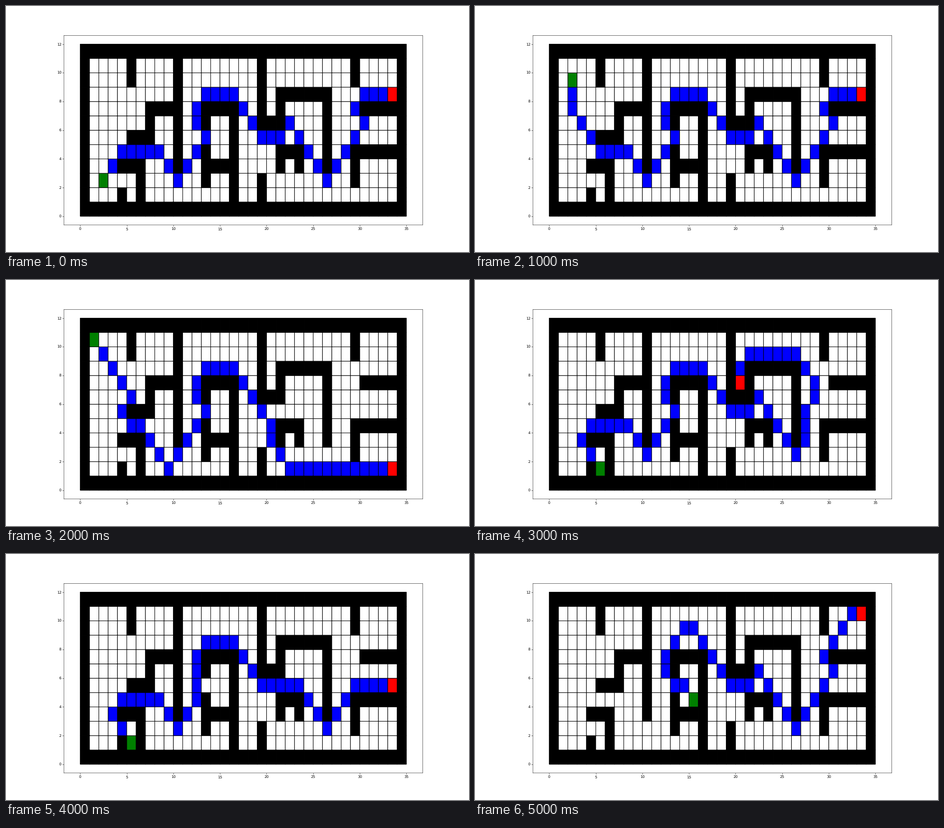
Write a matplotlib script that moves like this. It is 1026 px wide and 546 px high and loops after 6 s.

```python
import numpy as np
import matplotlib.pyplot as plt
from matplotlib.animation import FuncAnimation
from matplotlib.colors import ListedColormap

DPI = 57
W, H = 1026, 546
FREE, WALL, PATH, START, GOAL = range(5)
COLORS = ListedColormap(["white", "black", "blue", "green", "red"])

# Rooms inside the border, top row first; '#' is a wall.
ROOMS = """
....#....#........#.........#....
....#....#........#.........#....
.........#........#.######.......
......####..####..#.#....#...####
......#..#..#..#..###....#.......
....###..#.....#.........#.......
.........#..#..#....###..#..#####
...###...#..####....#.#..#..#....
.....#......#..#..#.........#....
...#.#.........#..#..............
""".split()

# Start, optional stops, goal; the walker finds the cells between.
TRIPS = [
    [(2, 2), (33, 8)],
    [(2, 9), (2, 8), (2, 7), (33, 8)],
    [(1, 10), (20, 3), (33, 1)],
    [(5, 1), (28, 6), (28, 7), (20, 7)],
    [(5, 1), (12, 5), (33, 5)],
    [(15, 4), (33, 10)],
]

inner = np.array([[WALL if c == "#" else FREE for c in row]
                  for row in reversed(ROOMS)])
maze = np.pad(inner, 1, constant_values=WALL)


def neighbours(cell):
    x, y = cell
    return [(i, j) for i in (x - 1, x, x + 1) for j in (y - 1, y, y + 1)
            if (i, j) != cell and maze[j, i] == FREE]


def distances(target):
    """Count the steps from every free cell to the target."""
    steps = {target: 0}
    queue = [target]
    for cell in queue:
        for near in neighbours(cell):
            if near not in steps:
                steps[near] = steps[cell] + 1
                queue.append(near)
    return steps


def walk(trip):
    """Take shortest legs, preferring cells nearer to the goal."""
    goal = trip[-1]
    cell = trip[0]
    for stop in trip[1:]:
        steps = distances(stop)
        while cell != stop:
            yield cell
            cell = min(neighbours(cell),
                       key=lambda c: (steps[c], np.hypot(c[0] - goal[0],
                                                         c[1] - goal[1])))


def solve(trip):
    grid = maze.copy()
    for x, y in walk(trip):
        grid[y, x] = PATH
    for (x, y), kind in ((trip[0], START), (trip[-1], GOAL)):
        grid[y, x] = kind
    return grid


grids = [solve(trip) for trip in TRIPS]

plt.rcParams["text.hinting"] = "none"
fig, ax = plt.subplots(figsize=(W / DPI + 1e-6, H / DPI + 1e-6), dpi=DPI)
mesh = ax.pcolormesh(grids[0], cmap=COLORS, vmin=-0.5, vmax=4.5,
                     edgecolors="black", linewidth=1.4, antialiased=True,
                     snap=False)
# Keep the default margins around the grid.
mesh.sticky_edges.x[:] = []
mesh.sticky_edges.y[:] = []
ax.autoscale_view()
for spine in ax.spines.values():
    spine.set_snap(False)


def update(i):
    mesh.set_array(grids[i])
    return [mesh]


anim = FuncAnimation(fig, update, frames=len(grids), interval=1000,
                     repeat=True, repeat_delay=0)
plt.show()
```
